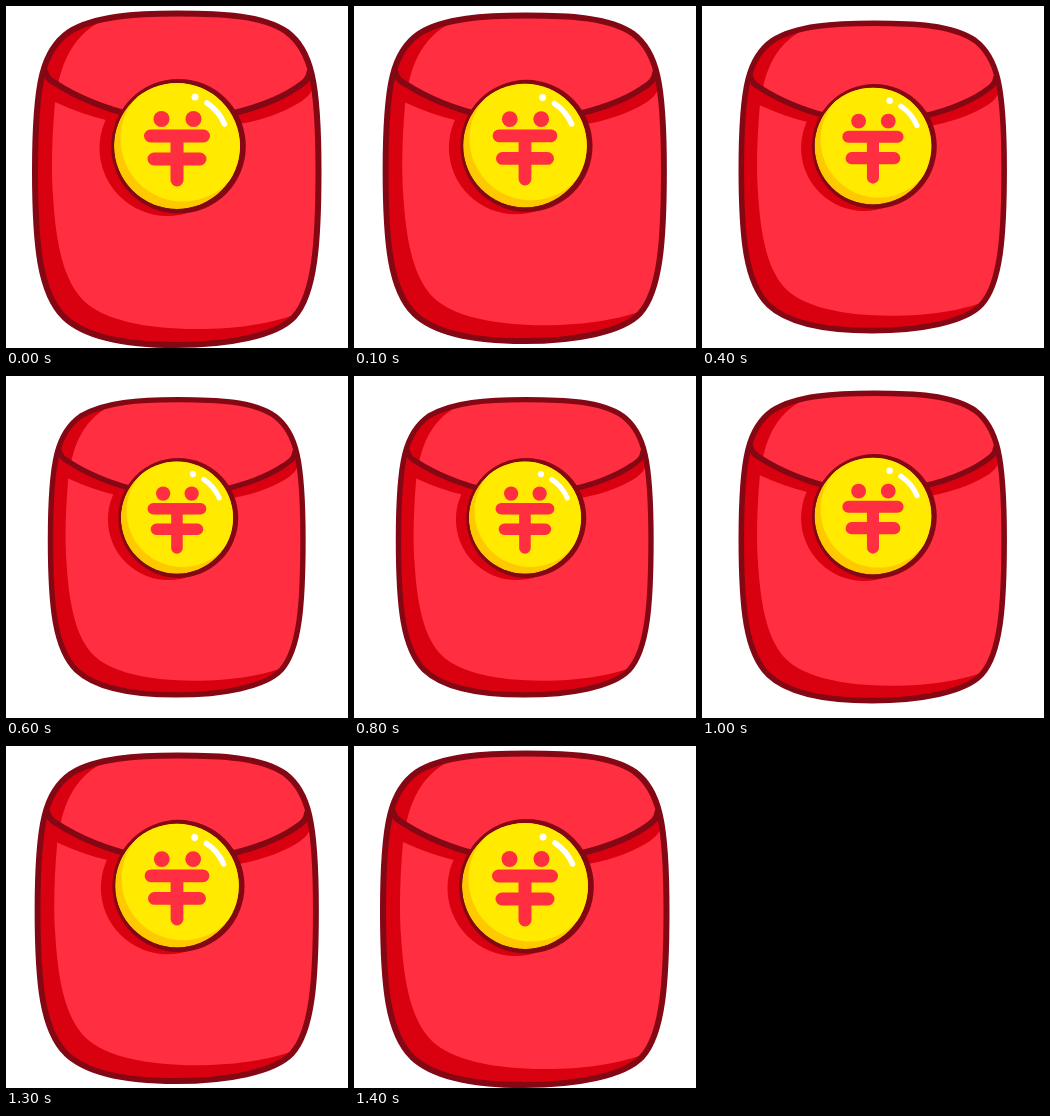
Write an HTML page that moves like this. It is 342 px wide and 342 px high and loops after 1500 ms.

```html
<!DOCTYPE html>
<html lang="en">
<head>
<meta charset="utf-8">
<title>Red envelope</title>
<style>
html, body { margin: 0; width: 100%; height: 100%; overflow: hidden; background: #fff; }
svg { display: block; width: 100vw; height: 100vh; }
.line { fill: none; stroke: #830814; stroke-width: 6; stroke-linecap: round; }
.rim { fill: #830814; }
.dark { fill: #d9000f; }
.red { fill: #ff2e40; }
.glyph { fill: none; stroke: #ff2e40; stroke-width: 13; stroke-linecap: round; }
.shine { fill: none; stroke: #fff; stroke-width: 5.5; stroke-linecap: round; }
</style>
</head>
<body>
<svg viewBox="0 0 342 342">
  <defs>
    <path id="body" d="M29 165C29 75 37 44 63 26C88 10 130 7.5 172 7.5C214 7.5 257 9 281 26C305 44 312.5 75 312.5 165C312.5 235 309 288 288 311C270 330 222 339 170 339C122 339 80 332 58 311C34 287 29 240 29 165Z"/>
    <path id="flap" d="M39 65C40 71 43 74 49 77C66 88 92 101 130 110H214C246 104 274 93 290 82C299 76 303 73 303.5 66"/>
    <clipPath id="inBody"><use href="#body"/></clipPath>
    <clipPath id="inCoin"><circle cx="171" cy="140" r="63"/></clipPath>
  </defs>
  <g id="envelope">
    <g clip-path="url(#inBody)">
      <rect class="dark" width="342" height="345"/>
      <path class="red" d="M49 96Q75 108 100 114L234 118C262 113 284 103 296 95C304 89 308 84 309 70H320V295C280 317 235 323 190 323C140 323 98 314 78 295C58 275 50 240 47 190C45 165 46 130 49 96Z"/>
      <circle class="dark" cx="161.500" cy="142" r="68"/>
      <path class="red" d="M52 79C66 88 92 101 130 110H214C246 104 274 93 290 82C299 76 303 73 303.5 66L325 0H112V9C70 20 57 54 52 79Z"/>
    </g>
    <use class="line" href="#flap"/>
    <use class="line" href="#body"/>
    <circle class="rim" cx="172.5" cy="140.300" r="67.300"/>
    <g clip-path="url(#inCoin)">
      <circle cx="171" cy="140" r="63" fill="#ffc900"/>
      <circle cx="177" cy="133" r="62.500" fill="#ffea00"/>
    </g>
    <circle class="red" cx="155.500" cy="113" r="8"/>
    <circle class="red" cx="187.500" cy="113" r="8"/>
    <path class="glyph" d="M144.500 130H197.500M148 153H194M171 130V174"/>
    <circle cx="189" cy="91" r="3.500" fill="#fff"/>
    <path class="shine" d="M201 97Q213 105 218.500 118"/>
  </g>
</svg>
<script>
const envelope = document.getElementById('envelope');
const LOOP = 1500, STEP = 100, LAST = 14;

// Shrinks for seven steps, then grows back the same way.
function draw(time) {
  const step = Math.floor((time % LOOP) / STEP);
  const n = Math.min(step, LAST - step);
  const scale = 1 - 0.0182 * n;
  const y = 173.5 - 1.1 * n + 0.128 * n * n;
  envelope.setAttribute('transform',
    `translate(170.5 ${y}) scale(${scale}) translate(-170.5 -173.5)`);
}

function tick() {
  draw(performance.now());
  requestAnimationFrame(tick);
}
tick();
</script>
</body>
</html>
```
